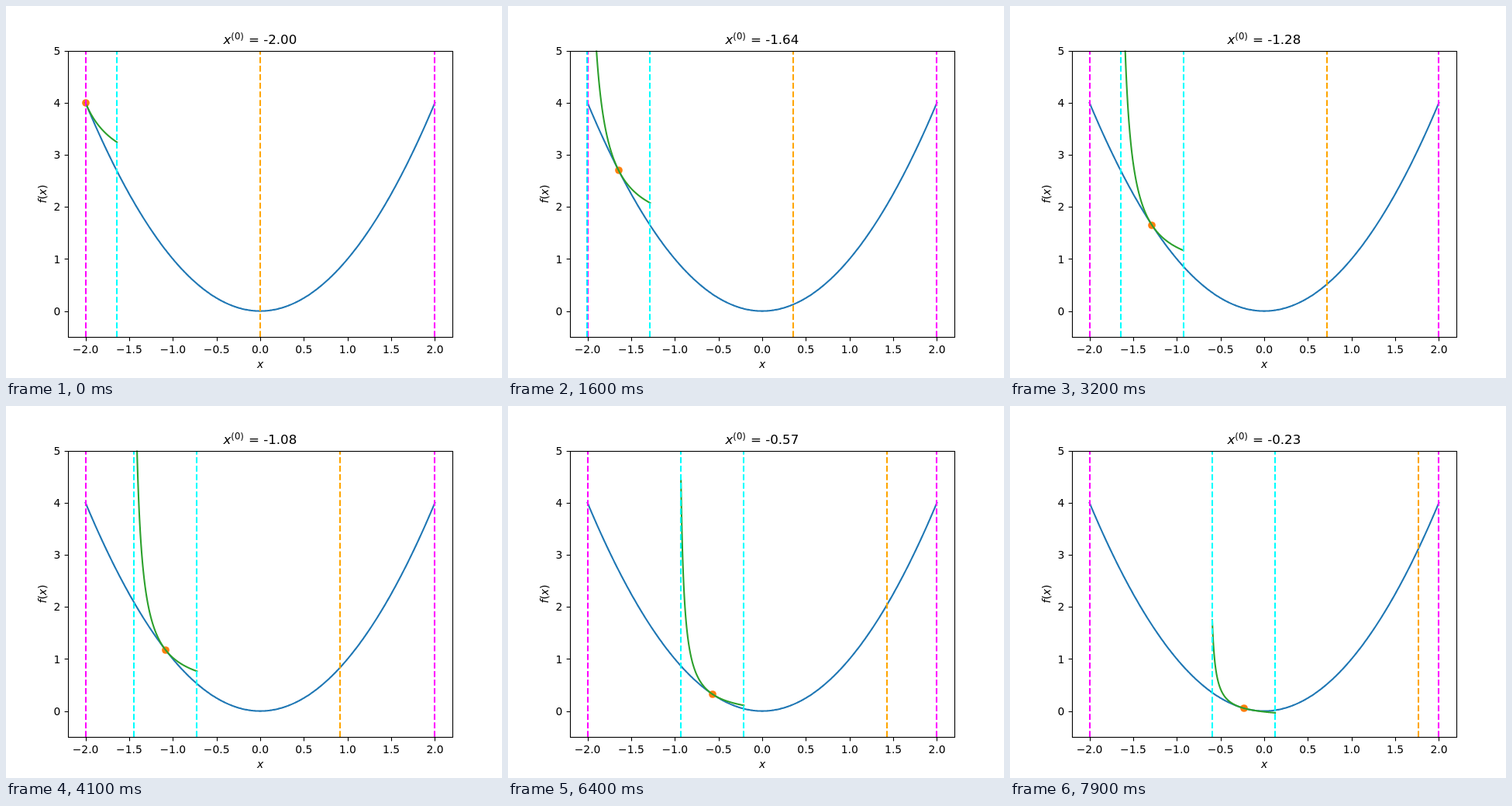
An HTML page with a canvas for the animation above (8000 ms loop, 640 by 480 pixels).

```html
<!DOCTYPE html>
<html lang="en">
<head>
<meta charset="utf-8">
<title>Convex approximation of a parabola</title>
<style>
html, body { margin: 0; width: 100%; height: 100%; overflow: hidden; background: #fff; }
canvas { display: block; }
</style>
</head>
<body>
<canvas width="640" height="480"></canvas>
<script>
const ctx = document.querySelector('canvas').getContext('2d');
const STEP_MS = 100, LOOP_MS = 8000;
const LEFT = 80, RIGHT = 576, TOP = 57.6, BOTTOM = 427.2;
const LINE = 1.5 * 100 / 72, THIN = 0.8 * 100 / 72;
const MOVE = 0.36, LOW_GAP = 0.4;
const SMALL = 13.89, LARGE = 16.67;

const px = x => 328 + x * (RIGHT - LEFT) / 4.4;
const py = y => 393.6 - y * 67.2;
const f = x => x * x;

function curve(fn, from, to, color) {
  const n = 400;
  ctx.beginPath();
  for (let i = 0; i <= n; i++) {
    const x = from + (to - from) * i / n;
    ctx.lineTo(px(x), py(fn(x)));
  }
  ctx.strokeStyle = color;
  ctx.lineWidth = LINE;
  ctx.lineCap = 'square';
  ctx.lineJoin = 'round';
  ctx.stroke();
}

function dot(x, y) {
  ctx.beginPath();
  ctx.arc(Math.round(px(x)), Math.round(py(y)), 4.86, 0, 2 * Math.PI);
  ctx.fillStyle = '#ff7f0e';
  ctx.fill();
}

function segment(x1, y1, x2, y2) {
  ctx.beginPath();
  ctx.moveTo(x1, y1);
  ctx.lineTo(x2, y2);
  ctx.stroke();
}

function dashed(x, color) {
  const at = Math.round(px(x));
  ctx.strokeStyle = color;
  ctx.lineWidth = LINE;
  ctx.lineCap = 'butt';
  ctx.setLineDash([3.7 * LINE, 1.6 * LINE]);
  segment(at, 427, at, 58);
  ctx.setLineDash([]);
}

function text(str, x, y, size = SMALL, align = 'center', style = '') {
  ctx.font = `${style} ${size}px "DejaVu Sans", sans-serif`;
  ctx.textAlign = align;
  ctx.fillStyle = '#000';
  ctx.fillText(str, x, y);
  return x + ctx.measureText(str).width;
}

function axes() {
  ctx.strokeStyle = '#000';
  ctx.lineWidth = THIN;
  ctx.lineCap = 'butt';
  ctx.lineJoin = 'miter';
  ctx.strokeRect(80.5, 58.5, 496, 369);
  for (let x = -2; x <= 2; x += 0.5) {
    const at = Math.round(px(x)) + 0.5;
    segment(at, 427.5, at, 432.4);
    text(x.toFixed(1).replace('-', '\u2212'), px(x), 448);
  }
  for (let y = 0; y <= 5; y++) {
    const at = Math.round(py(y)) + 0.5;
    segment(75.6, at, 80.5, at);
    text(String(y), 70.3, Math.round(py(y) + 5.2), SMALL, 'right');
  }
  text('x', 328, 467, SMALL, 'center', 'italic');

  ctx.save();
  ctx.translate(52, 254.5);
  ctx.rotate(-Math.PI / 2);
  let at = text('f', 0, 0, SMALL, 'left', 'italic');
  at = text('(', at, 0, SMALL, 'left');
  at = text('x', at, 0, SMALL, 'left', 'italic');
  text(')', at, 0, SMALL, 'left');
  ctx.restore();
}

function heading(x) {
  let at = text('x', 280.5, 49, LARGE, 'left', 'italic');
  at = text('(0)', at, 43, LARGE * 0.7, 'left');
  text(' = ' + x.toFixed(2), at + 0.8, 49, LARGE, 'left');
}

function draw() {
  const step = Math.floor(performance.now() % LOOP_MS / STEP_MS);
  const x0 = -2 + step * 4 / 179;

  // Reciprocal model touching the parabola at x0, with its pole at low
  const low = x0 - LOW_GAP;
  const q = -2 * x0 * LOW_GAP ** 2;
  const model = x => f(x0) - q / LOW_GAP + q / (x - low);

  ctx.fillStyle = '#fff';
  ctx.fillRect(0, 0, 640, 480);

  ctx.save();
  ctx.beginPath();
  ctx.rect(LEFT, TOP, RIGHT - LEFT, BOTTOM - TOP);
  ctx.clip();
  curve(f, -2, 2, '#1f77b4');
  dot(x0, f(x0));
  curve(model, Math.max(-2, x0 - MOVE), x0 + MOVE, '#2ca02c');
  dashed(-2, '#f0f');
  dashed(2, '#f0f');
  dashed(x0 - MOVE, '#0ff');
  dashed(x0 + MOVE, '#0ff');
  dashed(x0 + 2, '#ffa500');
  ctx.restore();

  axes();
  heading(x0);
  requestAnimationFrame(draw);
}
draw();
</script>
</body>
</html>
```
